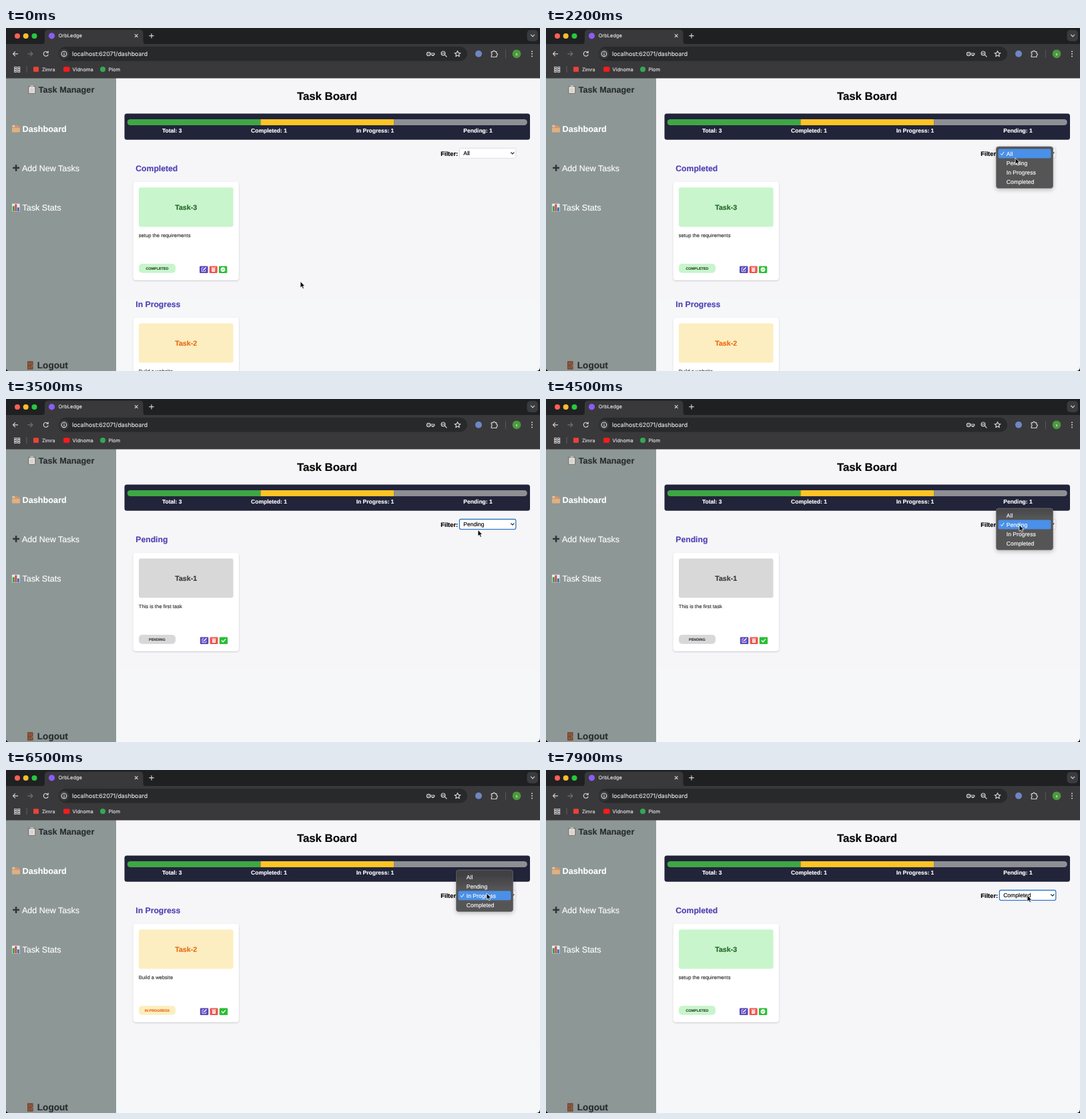
Recreate the animation shown at these times as an HTML page. Size 800x515 px, loop 8 s.

```html
<!DOCTYPE html>
<html lang="en">
<head>
<meta charset="utf-8">
<title>Task Board</title>
<style>
  html, body { margin: 0; width: 100%; height: 100%; overflow: hidden; background: #000; }
  svg { display: block; width: 800px; height: 515px; }
  text { font-family: "Liberation Sans", Arial, sans-serif; white-space: pre; text-rendering: geometricPrecision; }
  .ui { font-family: Inter, "Liberation Sans", sans-serif; }
  .b { font-weight: 700; }
  .mid { text-anchor: middle; }
  .line { fill: none; stroke: #d2d3d5; stroke-width: 1.2; stroke-linecap: round; stroke-linejoin: round; }
  .ink { fill: none; stroke: #fff; stroke-width: 1; stroke-linecap: round; stroke-linejoin: round; }
</style>
</head>
<body>
<svg id="stage" viewBox="0 0 800 515">
  <defs>
    <filter id="soft" x="-10%" y="-10%" width="120%" height="125%">
      <feDropShadow dx="0" dy="1" stdDeviation="1.2" flood-opacity=".22"/>
    </filter>
    <filter id="deep" x="-20%" y="-20%" width="140%" height="150%">
      <feDropShadow dx="0" dy="2" stdDeviation="3" flood-opacity=".26"/>
    </filter>
    <!-- the menu is darker where it lies over the summary bar -->
    <linearGradient id="glass" gradientUnits="userSpaceOnUse" x1="0" y1="158" x2="0" y2="178">
      <stop stop-color="#414144"/><stop offset="1" stop-color="#555557"/>
    </linearGradient>
    <clipPath id="pill"><rect x="181.6" y="137" width="599.3" height="9" rx="4.5"/></clipPath>
    <clipPath id="window"><path d="M0 0H800V509q0 6-6 6H6q-6 0-6-6z"/></clipPath>
  </defs>
  <rect width="800" height="515"/>
  <g clip-path="url(#window)">
    <rect y="75" width="800" height="440" fill="#f5f7f9"/>
    <rect x="165" y="75" width="635" height="331" fill="#f6f5f7"/>
    <rect y="75" width="165" height="440" fill="#8d9796"/>
    <g id="chrome"></g>
    <g id="side"></g>
    <g id="board"></g>
    <g id="cards"></g>
    <g id="picker"></g>
  </g>
  <path id="cursor" d="M0 0V9.6L2.2 7.6L3.7 11L5.4 10.2L3.9 7H6.8Z" fill="#000" stroke="#fff" stroke-width=".8" stroke-linejoin="round"/>
</svg>
<script>
const $ = id => document.getElementById(id);
// A hairline stroke gives the slightly heavy look of desktop text.
const text = (x, y, size, str, fill, cls = '') =>
  `<text x="${x}" y="${y}" font-size="${size}" class="${cls}" fill="${fill}" stroke="${fill}" stroke-width=".15">${str}</text>`;
const ui = (x, y, size, str) => text(x, y, size, str, '#e3e3e5', 'ui');
const rect = (x, y, w, h, fill, r = 0, more = '') =>
  `<rect x="${x}" y="${y}" width="${w}" height="${h}" rx="${r}" fill="${fill}" ${more}/>`;
const dot = (x, y, r, fill, more = '') => `<circle cx="${x}" cy="${y}" r="${r}" fill="${fill}" ${more}/>`;
const path = (d, cls = 'line', more = '') => `<path d="${d}" class="${cls}" ${more}/>`;

// Browser frame
const appGrid = [0, 1, 2, 3, 4, 5].map(i =>
  rect(12.6 + i % 2 * 5, 58.4 + (i >> 1) * 3, 3.2, 2, 'none', 0, 'stroke="#d2d3d5" stroke-width=".9"')).join('');

$('chrome').innerHTML =
  rect(0, 0, 800, 25, '#1f2022') +
  rect(0, 24, 800, 51.5, '#39393b') +
  `<path d="M53 24.5q5 0 5-5V8q0-5.5 5.5-5.5H200q5.5 0 5.5 5.5V19.5q0 5 5 5z" fill="#39393b"/>` +
  dot(17, 12, 4, '#fe5f57') + dot(29.7, 12, 4, '#febc2e') + dot(42.5, 12, 4, '#28c840') +
  dot(68.5, 11.8, 4.6, '#8b5cf6') +
  ui(78.5, 14.3, 7.5, 'OrbLedge') +
  path('M193.2 9.6l4 4m0-4l-4 4') +
  path('M214.8 11.7h6.4m-3.2-3.2v6.4') +
  rect(780.5, 3, 16.5, 17, '#3a3b3e', 5) + path('M786.5 10.2l2.6 2.6l2.6-2.6') +
  rect(79, 28, 612, 21.5, '#28292b', 10.7) +
  path('M17.6 38.8h-7m3-3.1l-3.1 3.1l3.1 3.1') +
  path('M32.8 38.8h7m-3-3.1l3.1 3.1l-3.1 3.1', 'line', 'opacity=".38"') +
  path('M62.6 36.6a3.5 3.5 0 1 0 .5 3.4M63.2 34.8v2.4h-2.4') +
  dot(87, 38.8, 7.2, '#3b3c3f') + dot(87, 38.8, 3.8, 'none', 'class="line"') +
  path('M87 38.6v2M87 36.8v.1') +
  ui(99, 41.9, 8.85, 'localhost:62071/dashboard') +
  dot(633, 39, 2.6, 'none', 'class="line"') + path('M635.8 38h6v2h-1.3v1.5h-2v-1.5h-2.7') + dot(633, 39, .8, '#d2d3d5') +
  dot(655, 37.9, 2.9, 'none', 'class="line"') + path('M657.2 40.2l2.8 2.8M653.8 37.9h2.4') +
  path('M676.5 34.4l1.3 2.9l3.1.3l-2.4 2l.7 3.1l-2.7-1.6l-2.7 1.6l.7-3.1l-2.4-2l3.1-.3z') +
  dot(708, 38.8, 5, '#6f86c5') +
  path('M727.2 35.7h2.3a1.6 1.6 0 0 1 3.2 0h2.2v2.6a1.5 1.5 0 0 1 0 3v2.2h-7.7v-2.5a1.5 1.5 0 0 0 0-2.8z') +
  rect(748, 33, 1, 12, '#56585b') +
  dot(765, 38.8, 6.4, '#4b9a3c') + text(765, 41, 5.8, 's', '#e3e3e5', 'ui mid') +
  [35.2, 38.8, 42.4].map(y => dot(788, y, 1, '#d2d3d5')).join('') +
  appGrid + rect(30.5, 57, 1, 10, '#5c5e61') +
  rect(41, 58.2, 8, 7.6, '#ea4335', 1) + ui(54, 64.7, 7.3, 'Zimra') +
  rect(86, 58.2, 9.5, 7.6, '#f61c1c', 1.8) + ui(99.5, 64.7, 7.5, 'Vidnoma') +
  dot(145, 62, 4, '#34a853') + ui(153.5, 64.7, 7.5, 'Plom');

// Sidebar
$('side').innerHTML =
  rect(33.3, 87, 11, 11.6, '#8a6a4e', 1) + rect(34.4, 88.3, 8.8, 9.4, '#e4e8ea') +
  rect(36.4, 85.9, 4.8, 2.8, '#b9bec1', 1) + path('M36 91.2h5.6m-5.6 2h5.6m-5.6 2h5.6', '', 'stroke="#a2a9ac" stroke-width=".6"') +
  text(48.7, 97, 12.7, 'Task Manager', '#292c2e', 'b') +
  rect(9.4, 147, 11.2, 9.5, '#c99a70', 1) + rect(9.4, 145.7, 4, 3, '#e7c49a', .8) +
  rect(14.2, 145.8, 3, 3, '#d98c85', .8) + rect(9, 150, 12, 6.6, '#e0b080', 1) +
  text(24.6, 156, 12.7, 'Dashboard', '#fff', 'b') +
  path('M15.1 205.2v9.8M10.2 210.1h9.8', '', 'stroke="#303437" stroke-width="2.5"') +
  text(24, 214.6, 12.5, 'Add New Tasks', '#fff') +
  rect(9, 263.8, 11.6, 11.8, '#e6eaec', .6) + rect(9.8, 267.4, 3, 7.8, '#3c9c52') +
  rect(13.3, 264.6, 3, 10.6, '#d84b45') + rect(16.8, 269.4, 3, 5.8, '#2d76b8') +
  text(24.4, 274, 12.6, 'Task Stats', '#fff') +
  rect(32, 500.3, 8.6, 12.4, '#75452f', .6) +
  [0, 1, 2, 3].map(i => rect(33.3 + i % 2 * 3.4, 501.8 + (i >> 1) * 5.4, 2.6, 4.3, '#8e5a40')).join('') +
  dot(39.4, 507, .6, '#d9b45a') +
  text(46.8, 511.4, 13.6, 'Logout', '#292c2e', 'b');

// Summary
const third = 599.3 / 3;
$('board').innerHTML =
  text(481, 107.8, 16.8, 'Task Board', '#000', 'b mid') +
  rect(177.5, 128.5, 607.5, 39.3, '#22243a', 3.5) +
  '<g clip-path="url(#pill)">' +
  ['#3fa744', '#fdc425', '#8e8f93'].map((c, i) => rect(181.6 + i * third, 137, third, 9, c)).join('') + '</g>' +
  [[248.7, 'Total: 3'], [394, 'Completed: 1'], [553, 'In Progress: 1'], [707, 'Pending: 1']]
    .map(([x, s]) => text(x, 157.3, 8.5, s, '#fff', 'b mid')).join('') +
  text(651.2, 191.6, 9.4, 'Filter:', '#000', 'b');

// Task cards
const tasks = {
  'Completed': { name: 'Task-3', note: 'setup the requirements', bg: '#c8f5cb', fg: '#23682b', done: true },
  'In Progress': { name: 'Task-2', note: 'Build a website', bg: '#fceec1', fg: '#e86c14' },
  'Pending': { name: 'Task-1', note: 'This is the first task', bg: '#d8d8d9', fg: '#3a3a3c' }
};

function card(status, dy) {
  const { name, note, bg, fg, done } = tasks[status];
  const x = done ? 290 : 290.8;
  const tick = done
    ? dot(x + 35, 362.7, 3.4, '#fff') + path(`M${x + 33.5} 362.8l1.1 1.1l2-2.2`, 'ink', 'style="stroke:#2bbe36"')
    : path(`M${x + 32.4} 362.8l1.9 1.9l3.6-3.8`, 'ink', 'style="stroke-width:1.3"');
  return `<g transform="translate(0 ${dy})">` +
    text(194.3, 215.2, 12.2, status, '#4f42b5', 'b') +
    rect(190.7, 231, 158.2, 147.5, '#fff', 4, 'filter="url(#soft)"') +
    rect(199, 239.5, 141.5, 59, bg, 3) +
    text(269.7, 272.8, 10.7, name, fg, 'b mid') +
    text(198.8, 313.9, 7.6, note, '#333') +
    rect(199, 354, 55, 13.8, bg, 5) +
    text(226.4, 362.6, 5.4, status.toUpperCase(), done ? '#2c4a30' : fg, 'b mid') +
    rect(x, 357.5, 12.5, 10.4, '#5747bb', 1.2) +
    path(`M${x + 5.6} 360h-2.4v5.7h5.7v-2.4`, 'ink', 'style="stroke-width:.8"') +
    path(`M${x + 5.5} 363.4l3.7-3.7`, 'ink', 'style="stroke-width:1.4"') +
    rect(x + 14.7, 357.5, 12, 10.4, '#ef554d', 1.2) +
    rect(x + 18.2, 361, 5, 4.9, '#fff', .7) + path(`M${x + 17.9} 359.9h5.6`, 'ink') +
    path(`M${x + 19.8} 362.1v2.6m1.8-2.6v2.6`, '', 'stroke="#ef554d" stroke-width=".6"') +
    rect(x + 28.9, 357.5, 12.4, 10.4, '#2bbe36', 1.2) + tick + '</g>';
}

// Filter control
const options = ['All', 'Pending', 'In Progress', 'Completed'];
const ROW = 14, ROW_TOP = 181.5;

function select(chosen, ring) {
  const edge = ring ? 'stroke="#2f78c8" stroke-width="1.3"' : 'stroke="#d9d9dc" stroke-width=".8"';
  return rect(679.4, 180.5, 84.4, 15.1, '#fff', 2, edge) +
    text(685.2, 191.1, 8.55, options[chosen], '#000') +
    path('M756.6 186.9l2.2 2.3l2.2-2.3', 'line', 'style="stroke:#222"');
}

function menu(chosen, hover) {
  const top = ROW_TOP - chosen * ROW;
  return rect(674.3, top - 3.4, 85.4, 62.6, 'url(#glass)', 4, 'stroke="#777" stroke-width=".6" filter="url(#deep)"') +
    options.map((name, i) => {
      const y = top + i * ROW;
      return (i === hover ? rect(677.5, y, 79, ROW, '#4a90e8', 2.5) : '') +
        (i === chosen ? path(`M681.3 ${y + 7.3}l1.6 2l3-4.6`, 'ink') : '') +
        text(689.8, y + 10, 8.6, name, '#fff');
    }).join('');
}

// time, x, y of the pointer tip
const moves = [
  [0, 441, 380.5], [300, 441, 380.5], [1400, 708, 189], [1800, 708, 189], [2200, 703, 195],
  [2700, 706, 201], [2900, 706, 201], [3500, 707, 196.5], [4000, 709, 189], [4500, 709, 189],
  [4900, 709, 202], [5400, 709, 201.5], [6100, 720, 185], [6500, 720, 185],
  [7000, 721, 202], [7200, 721, 202], [7700, 721, 188], [8000, 721, 188]
];
// time, chosen option, menu open
const states = [
  [0, 0, 0], [1700, 0, 1], [2800, 1, 0], [4200, 1, 1], [5000, 2, 0], [6300, 2, 1], [7100, 3, 0]
];

function pointer(t) {
  const i = moves.findIndex(m => m[0] > t);
  const [t0, x0, y0] = moves[i - 1], [t1, x1, y1] = moves[i];
  const p = (t - t0) / (t1 - t0), e = p * p * (3 - 2 * p);
  return [x0 + (x1 - x0) * e, y0 + (y1 - y0) * e];
}

let shownCards, shownPicker;

function draw(t) {
  const [x, y] = pointer(t);
  const [, chosen, open] = states.filter(s => s[0] <= t).pop();
  $('cursor').setAttribute('transform', `translate(${x} ${y})`);
  if (shownCards !== chosen) {
    shownCards = chosen;
    $('cards').innerHTML = chosen ? card(options[chosen], 0) : card('Completed', 0) + card('In Progress', 204);
  }
  const hover = Math.floor((y - ROW_TOP) / ROW) + chosen;
  const key = [chosen, open, open && hover].join();
  if (shownPicker !== key) {
    shownPicker = key;
    $('picker').innerHTML = select(chosen, chosen && !open) + (open ? menu(chosen, hover) : '');
  }
}

const start = performance.now();
function tick() {
  const t = (performance.now() - start) % 8000;
  draw(Math.floor(t / 100) * 100);
  requestAnimationFrame(tick);
}
tick();
</script>
</body>
</html>
```
